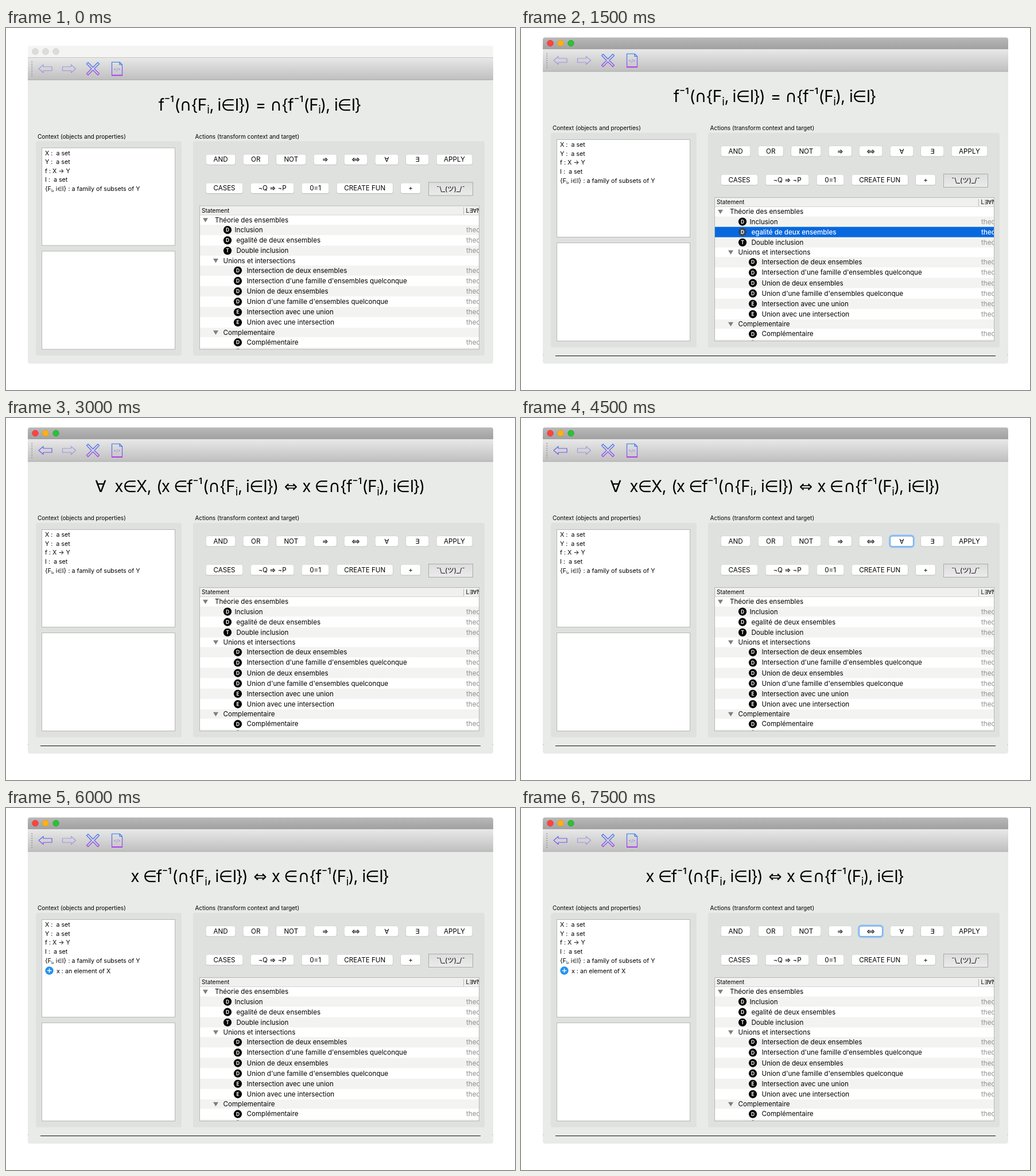
An HTML page for the animation above (8000 ms loop, 887 px wide and 631 px high).

```html
<!DOCTYPE html>
<html lang="en">
<head>
<meta charset="utf-8">
<title>Proof assistant</title>
<style>
html, body { margin: 0; width: 100%; height: 100%; overflow: hidden; background: #fff; }
svg { display: block; width: 887px; height: 631px; }
text { font-family: Inter, "DejaVu Sans", "Noto Sans CJK JP", sans-serif; font-size: 11.6px; white-space: pre; }
.small { font-size: 10.05px; }
.item { font-size: 10.7px; }
.mid { text-anchor: middle; }
.badge { font-size: 8.5px; font-weight: 700; fill: #fff; text-anchor: middle; }
.goal text { font-size: 28px; text-anchor: middle; }
.goal .sym { font-family: "DejaVu Sans", sans-serif; }
.goal .sup { font-size: 15px; font-weight: 600; }
.goal .sub { font-size: 19px; }
.ui { animation: settle 8s step-end infinite; }
@keyframes settle {
  0% { transform: translateY(14.5px); }
  18.75% { transform: none; }
}
</style>
</head>
<body>
<svg id="stage" viewBox="0 0 887 631"></svg>
<style id="timing"></style>
<script>
const LOOP = 8000;
const rules = new Set();

// Shows the content only between two times of the loop.
function during(from, to, content) {
  const name = `span${from}to${to}`;
  const pct = ms => ms / LOOP * 100 + '%';
  let steps = from ? '0% { visibility: hidden }' : '';
  steps += `${pct(from)} { visibility: visible }`;
  if (to < LOOP) steps += `${pct(to)} { visibility: hidden }`;
  rules.add(`@keyframes ${name} { ${steps} } .${name} { animation: ${name} 8s step-end infinite }`);
  return `<g class="${name}">${content}</g>`;
}

const rect = (x, y, x2, y2, fill, more = '') =>
  `<rect x="${x}" y="${y}" width="${x2 - x}" height="${y2 - y}" fill="${fill}" ${more}/>`;
const text = (x, y, str, cls = '', more = '') =>
  `<text x="${x}" y="${y}" class="${cls}" ${more}>${str}</text>`;
const circle = (x, y, r, fill, more = '') =>
  `<circle cx="${x}" cy="${y}" r="${r}" fill="${fill}" ${more}/>`;
const gradient = (id, from, to, more = '') =>
  `<linearGradient id="${id}" x1="0" x2="0" ${more || 'y1="0" y2="1"'}>
    <stop stop-color="${from}"/><stop offset="1" stop-color="${to}"/></linearGradient>`;

const defs = `<defs>
  ${gradient('bar', '#b9b9b9', '#a1a1a1')}
  ${gradient('tools', '#e8e9e8', '#bfbfbf')}
  ${gradient('flat', '#dcdddc', '#eaebea')}
  ${gradient('ink', '#2a7cf6', '#b13cf2', 'gradientUnits="userSpaceOnUse" y1="44" y2="69"')}
  <clipPath id="listClip">${rect(337, 295, 824, 545.3, '#000')}</clipPath>
</defs>`;

// Window chrome
const lights = (y, fills, edges) => fills.map((fill, i) =>
  circle(51 + 18 * i, y, 5.3, fill, `stroke="${edges[i]}" stroke-width=".7"`)).join('');
const roundTop = (y, y2, fill) =>
  `<path d="M38 ${y2}V${y + 4}q0-4 4-4H845q4 0 4 4V${y2}z" fill="${fill}"/>`;

const chrome =
  `<path d="M38 60H849V581q0 4-4 4H42q-4 0-4-4z" fill="#e9ebe8"/>` +
  during(0, 1500, roundTop(31, 51.5, '#f4f5f3') +
    lights(41, Array(3).fill('#dcdddb'), Array(3).fill('#c6c7c5'))) +
  during(1500, LOOP, roundTop(16.5, 36.5, 'url(#bar)') +
    lights(26.5, ['#fc4440', '#fdb116', '#2bc235'], ['#dc3633', '#dd9a10', '#20a42a']) +
    rect(60, 571, 827, 572, '#111') +
    [38.5, 847.5].map(x => rect(x, 569, x + 1, 570, '#999')).join(''));

// Toolbar
const outline = (d, more = '') =>
  `<path d="${d}" fill="none" stroke="url(#ink)" stroke-width="1.2" stroke-linejoin="round" ${more}/>`;
const arrow = 'M57 56.5L65 49.5V53H80V60H65V63.5z';
const cross = 'M143 45.5L151.5 54L160 45.5L162.5 48L154 56.5L162.5 65L160 67.5L151.5 59L143 67.5L140.5 65L149 56.5L140.5 48z';
const page = 'M184.5 45H198L202.5 49.5V68.5H184.5zM198 45V49.5H202.5M184.5 67.6H202.5';
const toolbar =
  rect(38, 36.5, 849, 76, 'url(#tools)') + rect(38, 36, 849, 37, '#a4a4a4') + rect(38, 75.3, 849, 76.3, '#aaa') +
  Array.from({ length: 7 }, (_, i) => rect(44.5, 44 + i * 4, 46, 45.5 + i * 4, '#888')).join('') +
  during(0, 3000, outline(arrow, 'opacity=".5"')) +
  during(3000, LOOP, outline(arrow)) +
  outline(arrow, 'opacity=".5" transform="translate(178.5 0) scale(-1 1)"') +
  outline(cross) + outline(page) +
  text(193.5, 60, '&lt;/&gt;', 'mid', 'style="font-size:7.5px" fill="#8a78ee"');

// Goal formulas, built from tokens [glyph, centre x, kind]
function glyphs(tokens, dx = 0) {
  return tokens.map(([ch, x, kind = '']) => {
    const cls = kind || ('∩∈∀⇔'.includes(ch) ? 'sym' : '');
    const dy = kind === 'sub' ? 5.5 : kind === 'sup' ? (ch === '−' ? -16.5 : -14.5) : 0;
    return text(x + dx, 129 + dy, ch, cls);
  }).join('');
}
const preimage = [['f', 271], ['−', 281, 'sup'], ['1', 289.5, 'sup'], ['(', 298.5], ['∩', 313], ['{', 328.5],
  ['F', 342], ['i', 352.5, 'sub'], [',', 358.5], ['i', 372], ['∈', 387], ['I', 402.5], ['}', 411], [')', 420.5]];
const meet = [['∩', 470.5], ['{', 486], ['f', 496.5], ['−', 506.5, 'sup'], ['1', 515, 'sup'], ['(', 523.5],
  ['F', 536.5], ['i', 546.5, 'sub'], [')', 553], [',', 561], ['i', 575.5], ['∈', 590], ['I', 605.5], ['}', 613.5]];
const member = [['x', 225], ['∈', 251], ['⇔', 443], ['x', 470.5], ['∈', 496.5]];
const equivalence = dx => glyphs(member, dx) + glyphs(preimage, dx - 4) + glyphs(meet, dx + 48.5);

const goal = `<g class="goal">` +
  during(0, 3000, glyphs(preimage) + glyphs([['=', 444]]) + glyphs(meet)) +
  during(3000, 6000, equivalence(53.5) +
    glyphs([['∀', 165], ['x', 197], ['∈', 216], ['X', 236.5], [',', 249.5], ['(', 267], [')', 725]])) +
  during(6000, LOOP, equivalence(0)) + `</g>`;

// Context
const panel = (x, x2) => rect(x, 182.7, x2, 556.5, '#dfe1de', 'rx="3"');
const box = (x, y, x2, y2) => rect(x, y, x2, y2, '#fff', 'stroke="#b6b8b5"');
const context =
  text(55, 178, 'Context (objects and properties)', 'small') + panel(52, 306) +
  box(62.5, 194.5, 294.5, 364.5) + box(62.5, 374.5, 294.5, 545.5) +
  ['X :  a set', 'Y :  a set', 'f : X → Y', 'I :  a set'].map((s, i) => text(68, 207 + i * 15.6, s, 'item')).join('') +
  text(68, 269.6, '{F<tspan font-size="7.5" dy="2">i</tspan><tspan dy="-2">, i</tspan><tspan font-size="9.5">∈</tspan>I}', 'item') +
  text(108.5, 269.6, ': a family of subsets of Y', 'item') +
  during(6000, LOOP, circle(75.5, 283.5, 7.2, '#2492f0') +
    `<path d="M71.7 283.5h7.6M75.5 279.7v7.6" stroke="#fff" stroke-width="1.4"/>` +
    text(88, 287.6, 'x : an element of X', 'item'));

// Actions
function button([label, x, x2], y) {
  return rect(x, y - 8.8, x2, y + 9.8, '#b9bbb8', 'rx="3.8"') +
    rect(x + .5, y - 8.6, x2 - .5, y + 8.9, '#fff', 'rx="3.4"') +
    text((x + x2) / 2, y + 4.1, label, 'mid');
}
const ring = x =>
  rect(x - .6, 204.8, x + 41.6, 225, 'none', 'rx="4.5" stroke="#9cc6f5" stroke-width="3"') +
  rect(x + .5, 205.9, x + 40.5, 223.9, 'none', 'rx="3.5" stroke="#5b9fe8"');
const firstRow = [['AND', 348, 400], ['OR', 413, 457.5], ['NOT', 470.5, 523], ['⇒', 536, 576.5], ['⇔', 589, 630],
  ['∀', 643, 684], ['∃', 696.5, 737], ['APPLY', 750, 813]];
const secondRow = [['CASES', 348, 413], ['¬Q ⇒ ¬P', 426, 502], ['0=1', 515, 563], ['CREATE FUN', 576, 674.5], ['+', 687.5, 722.5]];
const actions =
  text(329.5, 178, 'Actions (transform context and target)', 'small') + panel(326, 834) +
  firstRow.map(b => button(b, 214.5)).join('') + secondRow.map(b => button(b, 264.7)).join('') +
  rect(736.5, 254.5, 813.5, 277.5, 'url(#flat)', 'stroke="#a9aba8"') +
  text(775, 270, '¯\\_(ツ)_/¯', 'mid') +
  during(4500, 6000, ring(643)) + during(7500, LOOP, ring(589));

// Statement list: badge letter, label, optional label x
const statements = [
  ['', 'Théorie des ensembles', 364], ['D', 'Inclusion', 398.5], ['D', 'egalité de deux ensembles', 401.5],
  ['T', 'Double inclusion', 401.5], ['', 'Unions et intersections', 378.5],
  ['D', 'Intersection de deux ensembles'], ['D', "Intersection d'une famille d'ensembles quelconque"],
  ['D', 'Union de deux ensembles'], ['D', "Union d'une famille d'ensembles quelconque"],
  ['E', 'Intersection avec une union'], ['E', 'Union avec une intersection'],
  ['', 'Complementaire', 378.5], ['D', 'Complémentaire'], ['D', '']];

function row([badge, label, x = 419.5], y, height, index, selected) {
  const mid = y + height / 2;
  const ink = selected ? 'fill="#fff" font-weight="500"' : '';
  const fill = selected ? '#0868de' : index % 2 ? '#f3f4f2' : '#fff';
  const base = rect(338, y, 824, y + height, fill) + text(x, mid + 4, label, '', ink);
  if (!badge) {
    return base + `<path d="M${x === 364 ? 343 : 361} ${mid - 3.5}h9l-4.5 7.5z" fill="#7f807e"/>`;
  }
  const cx = x < 410 ? 386 : 404;
  return base + circle(cx, mid, 7.1, selected ? '#35485c' : '#000') + text(cx, mid + 3.1, badge, 'badge') +
    text(802, mid + 4, 'theorie', '', ink || 'fill="#8c8d8b"');
}

let rowY = 312, rows = '', chosen = '';
statements.forEach((entry, i) => {
  const height = entry[0] ? 18.1 : 16.5;
  rows += row(entry, rowY, height, i, false);
  if (i === 2) chosen = row(entry, rowY, height, i, true);
  rowY += height;
});
const list = `<g clip-path="url(#listClip)">` + rect(337, 295, 824, 546, '#fff') +
  rect(338, 296, 824, 311.5, '#f0f1ef') + rows + during(1500, 3000, chosen) +
  rect(338, 311, 824, 312, '#d4d5d3') + rect(797, 298, 798, 310.5, '#b8b9b7') +
  text(341, 307.3, 'Statement', 'small') + text(801.5, 307.3, 'L∃∀N', 'small') + `</g>` +
  rect(337.5, 295.5, 824.5, 545.5, 'none', 'stroke="#b6b8b5"');

document.getElementById('stage').innerHTML =
  defs + chrome + `<g class="ui">${toolbar + goal + context + actions + list}</g>`;
document.getElementById('timing').textContent = [...rules].join('\n');
</script>
</body>
</html>
```
